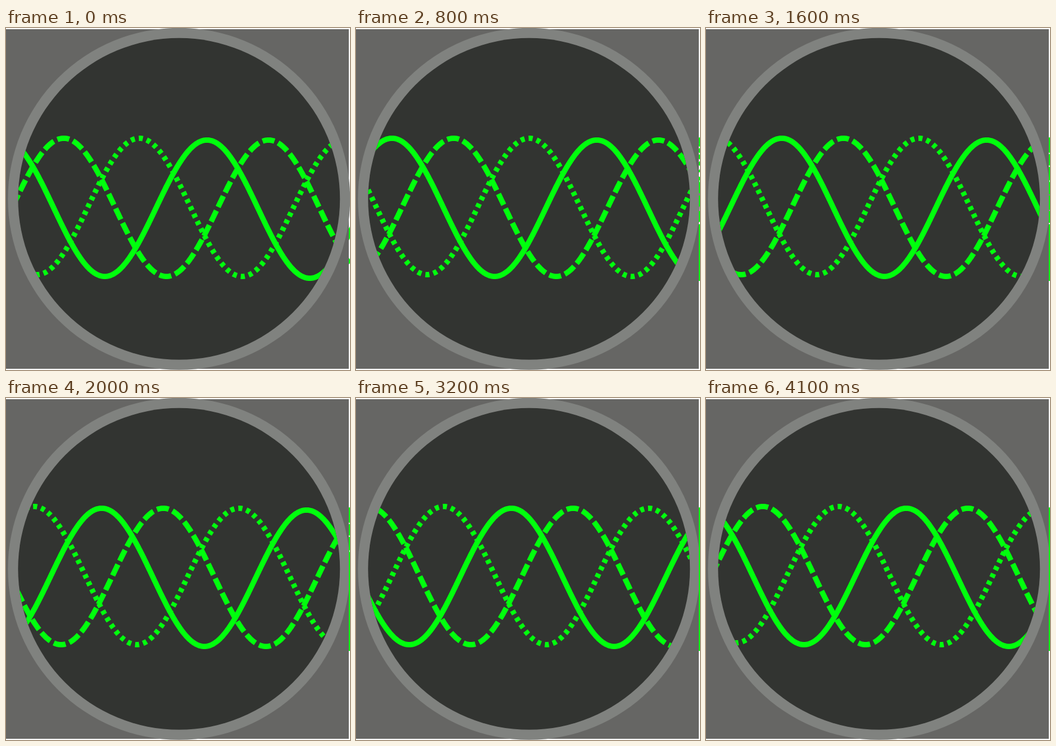
These frames come from a looping animation (575 by 572 pixels, 4200 ms). An HTML page with a canvas:

```html
<!DOCTYPE html>
<html lang="en">
<head>
<meta charset="utf-8">
<title>Three-phase scope</title>
<style>
  html, body { margin: 0; width: 100%; height: 100%; overflow: hidden; background: #fff; }
  canvas { display: block; }
</style>
</head>
<body>
<canvas id="scope" width="575" height="572"></canvas>
<script>
const ctx = document.getElementById('scope').getContext('2d');
const W = 575, H = 572, CX = 289.2, CY = 285.8;
const STEPS = 42, STEP_MS = 100, SPEED = 8.32;
const PERIOD = 342.5, AMP = 114.8, MID = 299.2, TILT = 3 / PERIOD;
const EDGE = 573;

// crest: x of a crest at time zero; lead: dash phase at the curve's start
const waves = [
  { crest: -6.3, dash: [], lead: 0 },
  { crest: 96.7, dash: [20.25, 6.75], lead: 12 },
  { crest: 223, dash: [6.75, 6.75], lead: 2 }
];

// One shared curve, starting two periods left of its crest
const curve = new Path2D();
for (let u = -2 * PERIOD; u <= 2 * PERIOD; u++) {
  curve.lineTo(u, MID + TILT * u - AMP * Math.cos(2 * Math.PI * u / PERIOD));
}

function drawWaves(step) {
  ctx.strokeStyle = '#00ff0d';
  ctx.lineWidth = 9;
  for (const { crest, dash, lead } of waves) {
    ctx.save();
    ctx.translate(crest + SPEED * step, 0);
    ctx.setLineDash(dash);
    ctx.lineDashOffset = lead;
    ctx.stroke(curve);
    ctx.restore();
  }
}

function disc(r, color) {
  ctx.beginPath();
  ctx.arc(CX, CY, r, 0, 2 * Math.PI);
  ctx.fillStyle = color;
  ctx.fill();
}

function draw(step) {
  ctx.fillStyle = '#fff';
  ctx.fillRect(0, 0, W, H);
  ctx.fillStyle = '#666664';
  ctx.fillRect(0, 2, EDGE, 568);
  disc(286, '#80827f');
  disc(269, '#323431');

  ctx.save();
  ctx.clip();
  drawWaves(step);
  ctx.restore();

  // The sliver right of the panel keeps its trail until the loop restarts
  ctx.save();
  ctx.beginPath();
  ctx.rect(EDGE, 0, W - EDGE, H);
  ctx.clip();
  for (let s = 0; s <= step; s++) drawWaves(s);
  ctx.restore();
}

let shown = -1;
function tick() {
  const step = Math.floor(performance.now() / STEP_MS) % STEPS;
  if (step !== shown) draw(shown = step);
  requestAnimationFrame(tick);
}
tick();
</script>
</body>
</html>
```
